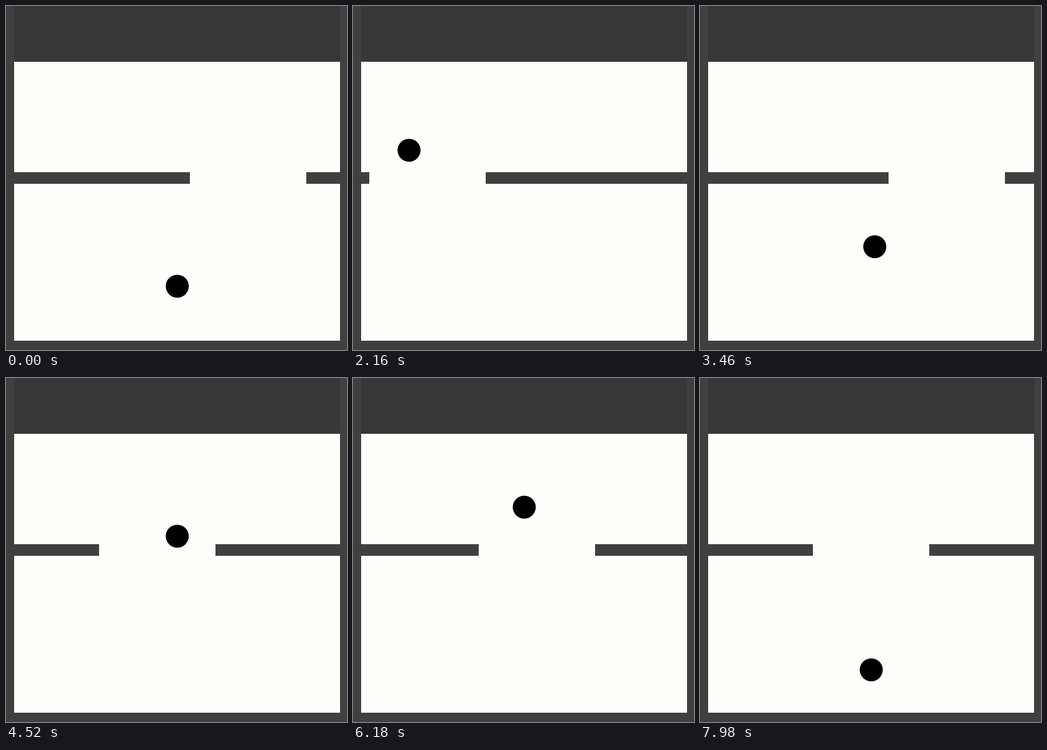
An HTML page with a canvas that plays this animation: 586 px wide and 592 px high, repeating every 8 s.

```html
<!DOCTYPE html>
<html lang="en">
<head>
<meta charset="utf-8">
<title>Ball and gap</title>
<style>
  html, body { margin: 0; width: 100%; height: 100%; overflow: hidden; background: #404040; }
  canvas { display: block; }
</style>
</head>
<body>
<canvas id="stage" width="586" height="592"></canvas>
<script>
const ctx = document.getElementById('stage').getContext('2d');
const LOOP = 8000, TICK = 20, FLIGHT_TIME = 780;
const GAP_WIDTH = 200, RADIUS = 20, CLEARANCE = 4;
const START_X = 294, START_Y = 506, TOP_Y = 132;
const UP = 10, SIDE = 6, CLIMB_LOSS = 2, STEER_BY = 18;
const WALL = '#404040', BAND = '#373737', FLOOR = '#fefefb';

const clamp = (value, low, high) => Math.min(high, Math.max(low, value));

// The ball respawns under a new gap each flight; detours take longer.
const flights = [
  { gap: 316 },
  { gap: 124 },
  { gap: 28, aim: 96, extra: 120 },
  { gap: 298, extra: 80 },
  { gap: 324 },
  { gap: 160 },
  { gap: 182, aim: 336 },
  { gap: 216 },
  { gap: 266 },
  { gap: 372, extra: 20 },
  { gap: 194 }
];

let nextStart = -3 * TICK;
for (const flight of flights) {
  const margin = RADIUS + CLEARANCE;
  flight.start = nextStart;
  flight.aim ??= clamp(START_X, flight.gap + margin, flight.gap + GAP_WIDTH - margin);
  nextStart += FLIGHT_TIME + (flight.extra ?? 0);
}

// Straight up, except for a diagonal run that ends before the wall if possible.
function ballAt({ start, aim }, time) {
  const ticks = (time - start) / TICK;
  const shift = aim - START_X;
  const sideTicks = Math.round(Math.abs(shift) / SIDE);
  const turn = Math.max(0, STEER_BY - sideTicks);
  const steered = clamp(ticks - turn, 0, sideTicks);
  const y = START_Y + SIDE - UP * ticks + CLIMB_LOSS * steered;
  return [START_X + Math.sign(shift) * SIDE * steered, clamp(y, TOP_Y, START_Y)];
}

function box(color, x, y, w, h) {
  ctx.fillStyle = color;
  ctx.fillRect(x, y, w, h);
}

function draw(now) {
  const time = Math.floor(now % LOOP / TICK) * TICK;
  const flight = flights.findLast(({ start }) => start <= time);
  const [x, y] = ballAt(flight, time);

  box(WALL, 0, 0, 586, 592);
  box(BAND, 14, 0, 560, 96);
  box(FLOOR, 14, 96, 560, 480);
  box(WALL, 14, 286, 560, 20);
  box(FLOOR, flight.gap, 286, GAP_WIDTH, 20);

  ctx.fillStyle = '#000';
  ctx.beginPath();
  ctx.arc(x + 0.3, y + 0.2, RADIUS - 0.2, 0, Math.PI * 2);
  ctx.fill();
}

let origin;
function frame(now) {
  origin ??= now;
  draw(now - origin);
  requestAnimationFrame(frame);
}
draw(0);
requestAnimationFrame(frame);
</script>
</body>
</html>
```
